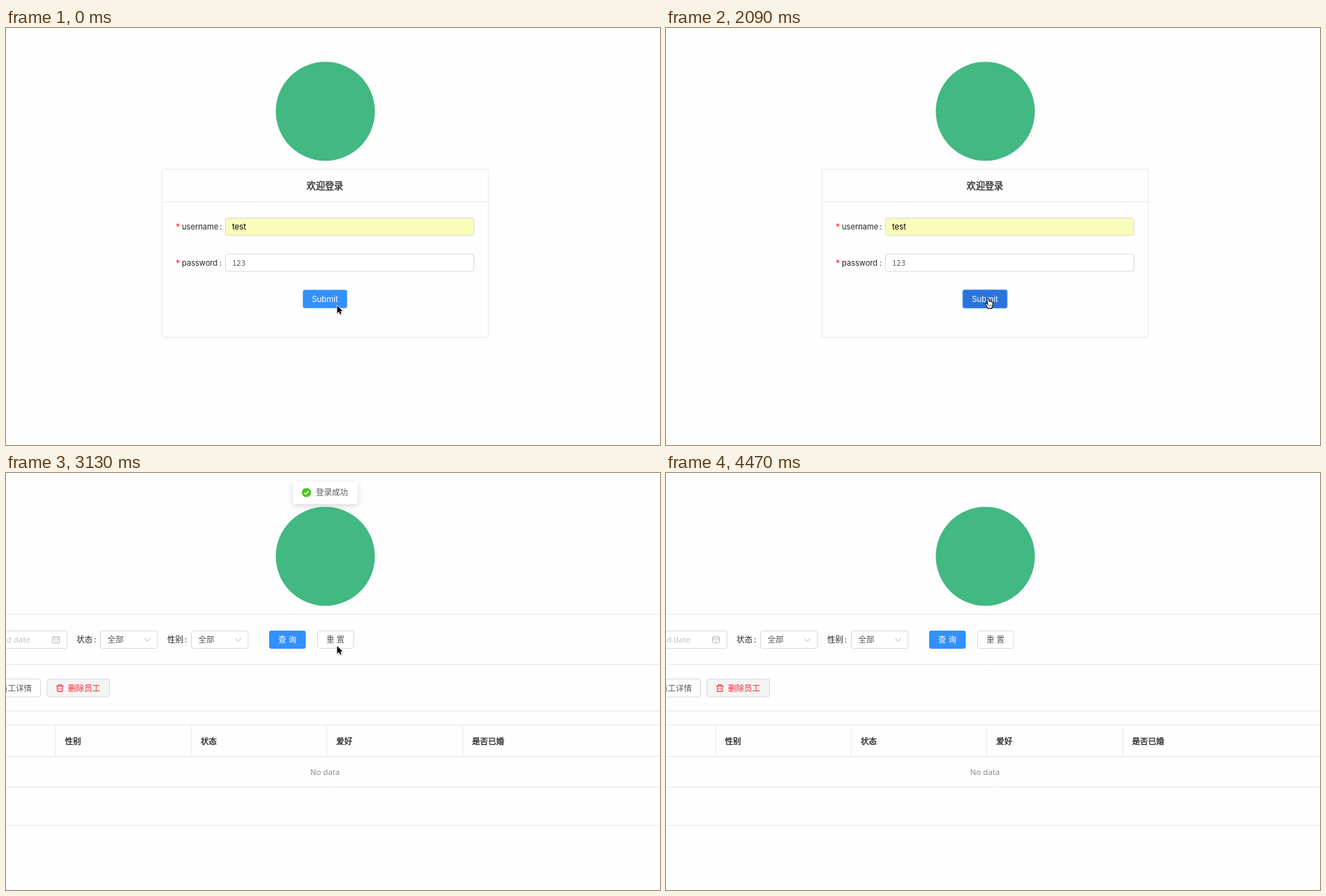
An HTML page with a canvas that plays this animation: 937 px wide and 598 px high, repeating every 4770 ms.

```html
<!DOCTYPE html>
<html lang="zh-CN">
<head>
<meta charset="utf-8">
<title>Login demo</title>
<style>
html, body { margin: 0; width: 100%; height: 100%; overflow: hidden; background: #fefefe; }
canvas { display: block; }
</style>
</head>
<body>
<canvas id="stage" width="937" height="598"></canvas>
<script>
const ctx = document.getElementById('stage').getContext('2d');
const LOOP = 4770;
const CJK = '"Open Sans", "Noto Sans CJK SC", "Noto Sans CJK", sans-serif';
const BODY = '11.5px ' + CJK;
const LABEL = '11.1px Inter, sans-serif';
const VALUE = '11.4px Inter, sans-serif';
const BLUE = '#3390ff', RED = '#f5222d', INK = '#262626', GREY = '#595959';
const RULE = '#e8e8e8', BORDER = '#d9d9d9', PAGE = '#fefefe';

// Each row holds from its time until the next: [time, x, y, shape]
const cursorSteps = [
  [0, 474, 397, 'arrow'], [140, 465.5, 392, 'hand'], [290, 464.5, 391, 'hand'],
  [1640, 461, 389, 'hand'], [1790, 461, 388, 'hand'], [1940, 461, 387, 'hand'],
  [2240, 460.5, 387, 'arrow'], [3130, 474, 247, 'arrow'], [3280, 464, 209, 'arrow'],
  [3430, 457, 201, 'arrow'], [3580, 526, 221, 'arrow'], [3730, 631, 317, 'arrow'],
  [3870, 798, 481.5, 'arrow'], [4020, 811, 501, 'arrow'], [4170, 856, 569, 'arrow'],
  [4320, 896, 597, 'arrow'], [4470, 0, 0, 'none']
];
// [time, vertical offset, opacity]
const toastSteps = [
  [0, 0, 0], [2240, -15.5, .65], [2390, 0, .95], [2540, 0, 1],
  [3730, 0, .97], [3870, -1, .85], [4020, 0, 0]
];
// [time, text opacity, rule opacity]
const tableSteps = [[0, .1, 0], [2390, .8, 1], [2540, 1, 1]];
const submitSteps = [[0, BLUE], [1790, '#2d7fec'], [1940, '#2873dc']];
const resetSteps = [[0, GREY, BORDER], [3280, '#4d86c4', '#9cc8f5'], [3430, GREY, BORDER]];

const arrow = new Path2D('M.5 1V12L3 9.7L4.7 13.4L6.5 12.6L4.9 9H8.2Z');
const hand = new Path2D('M-1.2 1.6C-1.4 .2 .6 -.1 1 1.3L2 5Q3.2 4.2 4 5.3Q5.2 4.7 5.7 5.9' +
  'Q7.2 5.6 7.2 7.2V10.2Q7 12 6 13V15H-.2V13.6L-3.4 9.3Q-3.8 7.8 -2.3 8L-.2 9.7Z');

const stepAt = (steps, t) => steps.findLast(step => step[0] <= t);

function text(str, x, centerY, color = INK, font = BODY, align = 'left') {
  ctx.font = font;
  ctx.fillStyle = color;
  ctx.textAlign = align;
  ctx.fillText(str, x, centerY + 4.2);
}

// Medium weight: regular glyphs with a thin outline
function heading(str, x, centerY, font, align) {
  text(str, x, centerY, INK, font, align);
  ctx.strokeStyle = INK;
  ctx.lineWidth = .35;
  ctx.strokeText(str, x, centerY + 4.2);
}

function box(x, y, w, h, fill, stroke, radius = 3) {
  ctx.beginPath();
  ctx.roundRect(x, y, w, h, radius);
  if (fill) { ctx.fillStyle = fill; ctx.fill(); }
  if (stroke) { ctx.strokeStyle = stroke; ctx.lineWidth = 1; ctx.stroke(); }
}

function line(color, width, ...points) {
  ctx.beginPath();
  for (let i = 0; i < points.length; i += 2) ctx.lineTo(points[i], points[i + 1]);
  ctx.strokeStyle = color;
  ctx.lineWidth = width;
  ctx.stroke();
}

function disc(x, y, r, color) {
  ctx.beginPath();
  ctx.arc(x, y, r, 0, 2 * Math.PI);
  ctx.fillStyle = color;
  ctx.fill();
}

const rule = y => line(RULE, 1, 0, y, 937, y);

function field(label, value, y, fill, color, font) {
  text('*', 243, y + 1, RED, '13px Inter, sans-serif');
  text(label, 252, y, INK, LABEL);
  text(':', 306, y, INK, LABEL);
  box(314.5, y - 12.5, 356, 25, fill, BORDER);
  text(value, 324, y, color, font);
}

function drawLogin(t) {
  box(223.5, 202.5, 467.5, 241, null, RULE, 2);
  line(RULE, 1, 223.5, 249.5, 691, 249.5);
  heading('欢迎登录', 457, 226.5, '13.1px ' + CJK, 'center');
  field('username', 'test', 285, '#f9fdbb', '#000', VALUE);
  field('password', '123', 336.5, '#fff', GREY, '10.6px "Noto Sans Mono", monospace');
  if (t >= 2090) box(424, 374.5, 66, 28, '#b9dcff', null, 4);
  box(425.3, 375.6, 63.4, 26.1, stepAt(submitSteps, t)[1]);
  text('Submit', 457, 388.5, '#fff', VALUE, 'center');
}

function select(label, x) {
  text(label, x, 239);
  text(':', x + 25, 239);
  box(x + 34.5, 226.5, 81.5, 25, '#fff', BORDER);
  text('全部', x + 44.5, 239, GREY);
  line('#b5b5b5', 1, x + 97.5, 237, x + 101.5, 241.5, x + 105.5, 237);
}

function drawFilters(t) {
  box(-90, 226.5, 177.5, 25, '#fff', BORDER);
  text('End date', 35, 239, '#bfbfbf', BODY, 'right');
  box(66.5, 235, 10, 8.5, null, '#b5b5b5', 1);
  line('#b5b5b5', 1, 66.5, 238, 76.5, 238);
  for (const x of [69, 74]) line('#b5b5b5', 1, x, 233.5, x, 236);
  line('#cfcfcf', 1, 68.5, 240.7, 74.5, 240.7);
  select('状态', 101);
  select('性别', 231);
  box(377, 226, 52.5, 26, BLUE);
  text('查 询', 403, 239, '#fff', BODY, 'center');
  const [, color, edge] = stepAt(resetSteps, t);
  box(446.5, 226.5, 51.5, 25, '#fff', edge);
  text('重 置', 472, 239, color, BODY, 'center');
}

function drawActions() {
  box(-60, 295.5, 109.5, 25.5, '#fff', BORDER);
  text('员工详情', -9, 308.5, GREY);
  box(58.5, 295.5, 90, 25.5, '#f4f4f4', BORDER);
  text('删除员工', 89, 308.5, RED);
  line(RED, 1, 72, 305.5, 82.5, 305.5);
  line(RED, 1, 75, 305, 75, 303.5, 79.5, 303.5, 79.5, 305);
  line(RED, 1, 73.3, 306, 73.8, 313.5, 80.7, 313.5, 81.2, 306);
  for (const x of [76, 78.6]) line(RED, .8, x, 307.5, x, 311.5);
}

function drawTable(t) {
  const [, textAlpha, ruleAlpha] = stepAt(tableSteps, t);
  ctx.globalAlpha = ruleAlpha;
  [361.5, 406.5, 450.5].forEach(rule);
  for (const x of [71, 265, 459.5, 654.5]) line(RULE, 1, x, 362, x, 406);
  ctx.globalAlpha = textAlpha;
  ['性别', '状态', '爱好', '是否已婚'].forEach((name, i) => heading(name, 84.5 + 194.4 * i, 384.5, BODY));
  text('No data', 457, 428.5, '#858585', BODY, 'center');
  ctx.globalAlpha = 1;
}

function drawToast(t) {
  const [, dy, alpha] = stepAt(toastSteps, t);
  if (!alpha) return;
  ctx.save();
  ctx.globalAlpha = alpha;
  ctx.translate(0, dy);
  ctx.shadowColor = 'rgba(0,0,0,.16)';
  ctx.shadowBlur = 9;
  ctx.shadowOffsetY = 2.5;
  box(411, 12, 92.5, 32.5, '#fff');
  ctx.shadowColor = 'transparent';
  disc(430.5, 28, 6.6, '#52c41a');
  line('#fff', 1.4, 427.6, 28.2, 429.8, 30.5, 433.6, 25.7);
  text('登录成功', 444, 28, GREY);
  ctx.restore();
}

function drawCursor(t) {
  const [, x, y, shape] = stepAt(cursorSteps, t);
  if (shape === 'none') return;
  const isArrow = shape === 'arrow';
  const path = isArrow ? arrow : hand;
  ctx.save();
  ctx.translate(x, y);
  ctx.lineJoin = 'round';
  ctx.lineWidth = isArrow ? 1.6 : 1;
  ctx.strokeStyle = isArrow ? '#fff' : '#000';
  ctx.fillStyle = isArrow ? '#000' : '#fff';
  if (isArrow) {
    ctx.shadowColor = 'rgba(0,0,0,.3)';
    ctx.shadowBlur = 2;
    ctx.shadowOffsetY = 1;
  }
  ctx.stroke(path);
  ctx.shadowColor = 'transparent';
  ctx.fill(path);
  if (!isArrow) {
    ctx.stroke(path);
    for (const fx of [1.5, 3.3, 5.1]) line('#000', .5, fx, 9.5, fx, 12.3);
  }
  ctx.restore();
}

function draw(now) {
  const t = now % LOOP;
  ctx.fillStyle = PAGE;
  ctx.fillRect(0, 0, 937, 598);
  disc(457.5, 119.5, 71, '#42b883');
  if (t < 2240) {
    drawLogin(t);
  } else {
    [202.5, 274.5, 341.5, 505.5].forEach(rule);
    drawFilters(t);
    drawActions();
    drawTable(t);
    drawToast(t);
  }
  drawCursor(t);
}

const start = performance.now();
function tick() {
  draw(performance.now() - start);
  requestAnimationFrame(tick);
}
tick();
</script>
</body>
</html>
```
